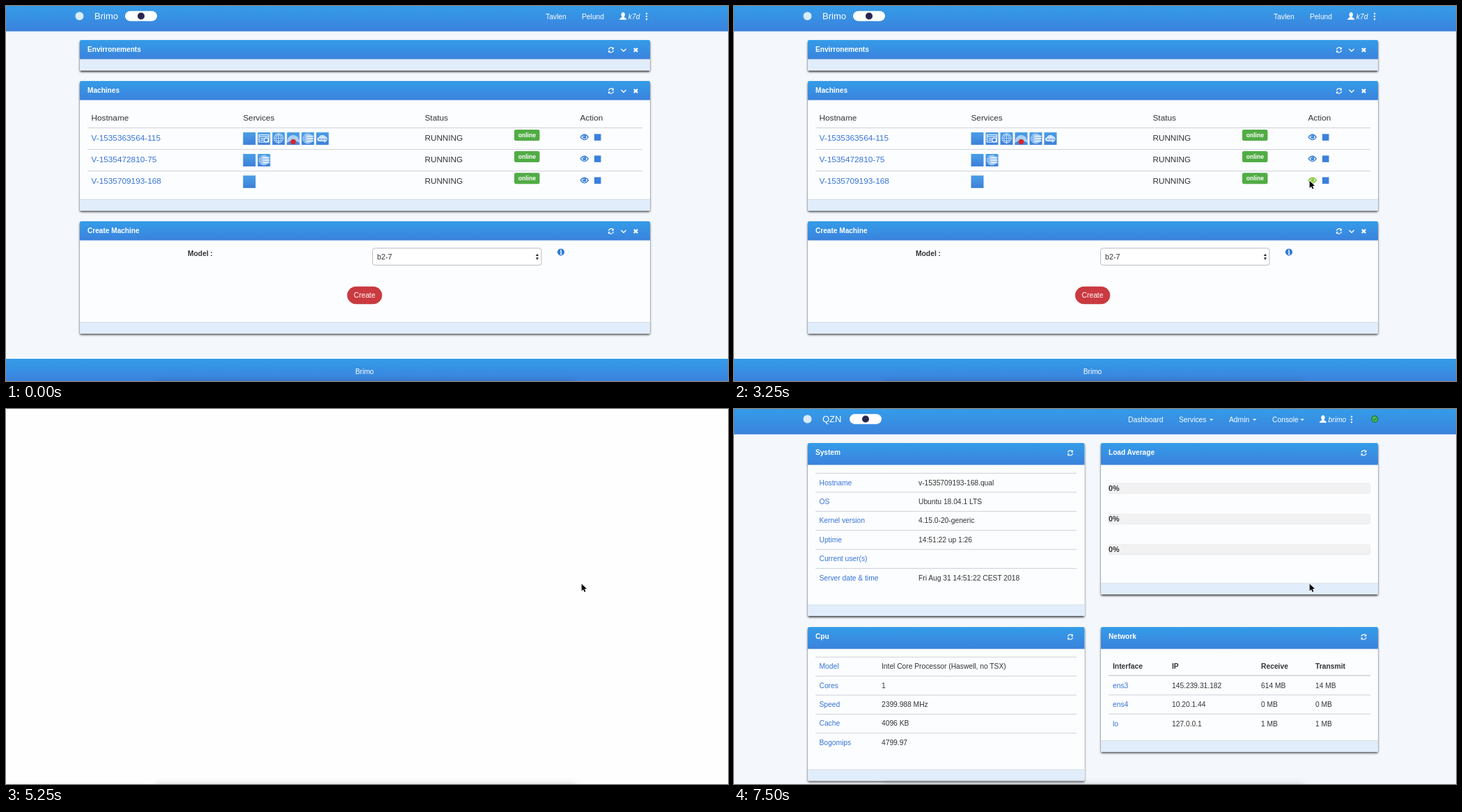
Write an HTML page that moves like this. It is 1037 px wide and 540 px high and loops after 8 s.

```html
<!DOCTYPE html>
<html lang="en">
<head>
<meta charset="utf-8">
<title>Machine dashboard</title>
<style>
html, body { margin: 0; width: 100%; height: 100%; overflow: hidden; background: #fefefe; }
svg { display: block; font-family: "Liberation Sans", Arial, sans-serif; }
text { white-space: pre; }
</style>
</head>
<body>
<svg id="stage" width="1037" height="540" viewBox="0 0 1037 540">
  <defs>
    <linearGradient id="bar" x2="0" y2="1">
      <stop offset="0" stop-color="#349ce8"/><stop offset="1" stop-color="#3b82dd"/>
    </linearGradient>
    <linearGradient id="tile" x2="0" y2="1">
      <stop offset="0" stop-color="#4b9fe6"/><stop offset="1" stop-color="#3d7fd9"/>
    </linearGradient>
    <filter id="drop" x="-5%" y="-20%" width="110%" height="160%">
      <feDropShadow dx="0" dy="2" stdDeviation="1.7" flood-color="#000" flood-opacity=".72"/>
    </filter>
    <filter id="blur" x="-20%" y="-100%" width="140%" height="300%">
      <feGaussianBlur stdDeviation="5"/>
    </filter>
  </defs>
  <g id="scenes"></g>
  <rect id="status" x="-8" y="539" height="20" fill="#000" opacity=".035" filter="url(#blur)"/>
  <rect x="214" y="539" width="604" height="22" fill="#000" opacity=".13" filter="url(#blur)"/>
  <path id="cursor" d="M0 0V10.3L2.4 8.1L4 11.8L5.8 11L4.2 7.4H7.4Z" fill="#000" stroke="#fff" stroke-width=".9" paint-order="stroke"/>
</svg>
<script>
const LINK = '#3572d9', INK = '#333', BLUE = '#3a80dc', HOVER = '#7cc62c';
const LOOP = 8000;
const $ = id => document.getElementById(id);

const rect = (x, y, w, h, fill, more = '') =>
  `<rect x="${x}" y="${y}" width="${w}" height="${h}" fill="${fill}" ${more}/>`;
const circle = (x, y, r, fill, more = '') =>
  `<circle cx="${x}" cy="${y}" r="${r}" fill="${fill}" ${more}/>`;
const path = (d, stroke, width = 1, fill = 'none') =>
  `<path d="${d}" stroke="${stroke}" stroke-width="${width}" fill="${fill}"/>`;
const text = (x, y, str, size = 10.25, fill = INK, more = '') =>
  `<text x="${x}" y="${y}" font-size="${size}" fill="${fill}" ${more}>${str.replace(/&/g, '&amp;')}</text>`;
const bold = (x, y, str, size = 10.2, fill = INK) => text(x, y, str, size, fill, 'font-weight="700"');
const at = (x, y, body, more = '') => `<g transform="translate(${x} ${y})" ${more}>${body}</g>`;
const group = (id, body) => `<g id="${id}">${body}</g>`;
const rule = (x1, x2, y, w = 1) => path(`M${x1} ${y}H${x2}`, '#cdd1d7', w);

// Icons, each centred on 0,0
const refresh = path('M-3.5 -.6A3.6 3.6 0 0 1 2.7 -2.5M3.5 .6A3.6 3.6 0 0 1 -2.7 2.5', '#fff', 1.2) +
  path('M3.9 -4.2V-.9H.7ZM-3.9 4.2V.9H-.7Z', 'none', 0, '#fff');
const chevron = path('M-3.6 -1.6L0 2L3.6 -1.6', '#fff', 1.3);
const cross = path('M-2.6 -2.6L2.6 2.6M2.6 -2.6L-2.6 2.6', '#fff', 2.2);
const caret = path('M-2.8 -1.3H2.8L0 1.6Z', 'none', 0, '#fff');
const person = path('M-5 5.2C-5 2.7 -1.6 2.6 -1.6 1.1C-3.4 -1 -3 -5.4 0 -5.4S3.4 -1 1.6 1.1C1.6 2.6 5 2.7 5 5.2Z', 'none', 0, '#fff');
const dots = [-4, 0, 4].map(y => circle(0, y, 1.25, '#fff')).join('');
const eye = '<path d="M-5.6 0Q0 -7.6 5.6 0Q0 7.6 -5.6 0Z" fill="none" stroke="currentColor" stroke-width="1.3"/>' +
  circle(0, -.5, 2.6, 'currentColor') + circle(-.8, -1.3, .8, '#fff');

const tileBase = rect(-9, -9, 18, 18, 'url(#tile)');
const tiles = {
  plain: tileBase,
  card: tileBase + rect(-7, -5.5, 14, 10.5, 'none', 'stroke="#e6f1fd" stroke-width="1.2"') +
    path('M-7 -3H7M-5 0H0M-5 2.5H-1', '#e6f1fd', 1.3) + circle(3.2, 2, 3, '#4a8fe0', 'stroke="#fff" stroke-width="1.2"'),
  globe: tileBase + circle(0, -.5, 6.6, 'none', 'stroke="#d5e7fb"') +
    path('M-6.6 -.5H6.6M0 -7V8M-5.5 -4H5.5M-5.5 3H5.5M0 -7C-5 -3 -5 2 0 6C5 2 5 -3 0 -7', '#d5e7fb', .8),
  dome: tileBase + path('M-9 5C-8 -3 -4 -5 0 -5S8 -3 9 5V9H-9Z', 'none', 0, '#a9d2f3') +
    path('M-9 9V6C-4 2 4 2 9 6V9Z', 'none', 0, '#4a86d8') + circle(0, 4.6, 3.7, '#d8232f'),
  list: tileBase + circle(0, 0, 7.6, '#9cc6f3') +
    path('M-2 -3.5H8M-2 0H8M-2 3.5H8', '#f2f8ff', 1.5) + path('M-6 -3.5H-4M-6.5 0H-4M-6 3.5H-4', '#5c9be4', 1.2),
  cloud: tileBase + path('M-5 4C-9 3 -8 -2 -5 -2C-4 -6 3 -6 4 -3C8 -3 8 3 5 4L3 6L2 4Z', 'none', 0, '#cfe3fa') +
    path('M-5 1H-2M-1 1H2M3 1H6', '#4a8fe0', 1.3)
};

function panel(x, y, w, head, bottom, title, tools) {
  return `<g filter="url(#drop)">${rect(x, y, w, bottom - y, '#fcfdff', 'rx="2"')}</g>` +
    rect(x, bottom - 16, w, 16, '#e2edfb') + path(`M${x} ${bottom - 16}H${x + w}`, '#cfd8e4', .8) +
    path(`M${x} ${y + head}V${y + 2}Q${x} ${y} ${x + 2} ${y}H${x + w - 2}Q${x + w} ${y} ${x + w} ${y + 2}V${y + head}Z`, 'none', 0, 'url(#bar)') +
    bold(x + 11, y + 17, title, 10.1, '#fff') +
    tools.map(([dx, icon]) => at(x + w + dx, y + 14.3, icon)).join('');
}

function navbar(name, pillX, userX, user, links) {
  return rect(0, 0, 1037, 540, '#f4f7fc') + rect(0, 0, 1037, 36.5, 'url(#bar)') +
    circle(105.5, 14.5, 6, '#d9ebfc') + text(127, 19.3, name, 13, '#fff') +
    rect(pillX, 7.3, 46, 14.4, '#fff', 'rx="7.2"') + circle(pillX + 23, 14.5, 5, '#28264e') +
    links.map(([x, s]) => text(x, 18.6, s, 10.3, '#fff')).join('') +
    at(userX, 14.5, person) + text(userX + 7.5, 18.6, user, 10.3, '#fff', 'font-style="italic"');
}

function machines() {
  const tools = [[-56, refresh], [-38, chevron], [-20.5, cross]];
  const rows = [
    ['V-1535363564-115', 'plain card globe dome list cloud'],
    ['V-1535472810-75', 'plain list'],
    ['V-1535709193-168', 'plain']
  ];
  const heads = [[122.5, 'Hostname'], [340.5, 'Services'], [601.5, 'Status'], [824.5, 'Action']];
  let s = navbar('Brimo', 171, 886.3, 'k7d', [[775, 'Tavlen'], [827, 'Pelund']]) + at(920, 15, dots);
  s += panel(106, 49, 819, 27.5, 93, 'Envirronements', tools);
  s += panel(106, 108, 819, 27.5, 294.5, 'Machines', tools);
  s += heads.map(([x, h]) => text(x, 165, h, 11.8)).join('');
  rows.forEach(([host, icons], i) => {
    const y = 189.3 + i * 31.1;
    s += rule(117, 914, y - 13.8) + text(122.5, y + 4.4, host, 11.8, LINK);
    s += icons.split(' ').map((k, n) => at(349.5 + n * 21, y + 1.6, tiles[k])).join('');
    s += text(601.5, y + 4.4, 'RUNNING', 11.7) + rect(730, y - 11.3, 36.5, 16, '#51ac46', 'rx="2.5"');
    s += bold(735.7, y - .3, 'online', 8.6, '#fff');
    s += at(830.8, y - .5, eye, `id="eye${i}"`) + rect(845, y - 5, 9.5, 9.5, BLUE);
  });
  s += panel(106, 310, 819, 27.5, 471.5, 'Create Machine', tools);
  s += bold(261, 359.5, 'Model :', 10.3);
  s += rect(526.5, 348.8, 242.5, 24.4, '#fff', 'rx="3.5" stroke="#b9bcc1"') + text(533, 365, 'b2-7', 10.8);
  s += path('M760.8 360L763 356.4L765.2 360ZM760.8 362.2L763 365.8L765.2 362.2Z', 'none', 0, INK);
  s += circle(797, 354.4, 5, '#2f7bd9') + path('M796 353.7H797.3V357.3M795.7 357.3H798.6', '#fff', 1.2) + circle(797, 351.7, .9, '#fff');
  s += rect(490.3, 404.3, 49.6, 24.6, '#ca3a40', 'rx="12.3" stroke="#bd3439" stroke-width=".7"');
  s += text(515, 420.2, 'Create', 10.3, '#fff', 'text-anchor="middle"');
  s += rect(0, 508, 1037, 32, 'url(#bar)') + text(515, 530.3, 'Brimo', 10.2, '#fff', 'text-anchor="middle"');
  return s;
}

// Rows of label and value; values sit in their own group to appear later
function facts(id, y, valueX, rows) {
  const line = i => y + i * 27.42;
  return rows.map(([k], i) => rule(117, 492, line(i)) + text(122.5, line(i) + 17, k, 10.25, LINK)).join('') +
    group(id, rows.map(([, v], i) => text(valueX, line(i) + 17, v)).join(''));
}

function network(bottom, cols, rows) {
  const heads = ['Interface', 'IP', 'Receive', 'Transmit'];
  let s = panel(527, 314, 398, 31.5, bottom, 'Network', [[-20.5, refresh]]);
  s += heads.map((h, i) => bold(cols[i], 373.8, h, 10.3)).join('') + rule(538, 914, 383.8, 1.5);
  rows.forEach((r, i) => {
    const y = 401.7 + i * 27.4;
    if (i) s += rule(538, 914, y - 17.3);
    s += r.map((v, c) => text(cols[c], y, v, 10.25, c ? INK : LINK)).join('');
  });
  return s;
}

function dashboard() {
  const tool = [[-20.5, refresh]];
  let s = navbar('QZN', 166, 846, 'brimo', [[566, 'Dashboard'], [639, 'Services'], [711, 'Admin'], [773, 'Console']]);
  s += [685.7, 747.7, 816.2].map(x => at(x, 15.5, caret)).join('') + at(887, 15, dots);
  s += at(920.3, 14.4, circle(0, 0, 4.4, 'none', 'id="ring" stroke="#14803a" stroke-width="1.4"') + path('M-2.2 0L-.5 1.7L2.5 -1.8', '#14803a', 1.3));
  s += panel(106, 49, 397.5, 31.5, 298, 'System', tool);
  s += facts('sysValues', 92.5, 265, [
    ['Hostname', 'v-1535709193-168.qual'], ['OS', 'Ubuntu 18.04.1 LTS'], ['Kernel version', '4.15.0-20-generic'],
    ['Uptime', '14:51:22 up 1:26'], ['Current user(s)', ''], ['Server date & time', 'Fri Aug 31 14:51:22 CEST 2018']
  ]);
  s += panel(527, 49, 398, 31.5, 267, 'Load Average', tool);
  s += [107, 151.2, 195.4].map(y =>
    rect(538, y, 375.5, 14.4, '#f2f2f3', 'rx="2.5" stroke="#e4e5e7" stroke-width=".7"') + bold(538, y + 11, '0%', 10.7)).join('');
  s += panel(106, 314, 397.5, 31.5, 535.3, 'Cpu', tool);
  s += facts('cpuValues', 357.2, 212, [
    ['Model', 'Intel Core Processor (Haswell, no TSX)'], ['Cores', '1'], ['Speed', '2399.988 MHz'],
    ['Cache', '4096 KB'], ['Bogomips', '4799.97']
  ]);
  s += group('netEmpty', network(412, [544, 658, 703, 808], []));
  s += group('netFull', network(493.5, [544, 629, 757, 835], [
    ['ens3', '145.239.31.182', '614 MB', '14 MB'], ['ens4', '10.20.1.44', '0 MB', '0 MB'], ['lo', '127.0.0.1', '1 MB', '1 MB']
  ]));
  return s;
}

$('scenes').innerHTML = group('machines', machines()) +
  group('blank', rect(0, 0, 1037, 540, '#fefefe')) + group('dashboard', dashboard());

const show = (id, on) => { $(id).style.display = on ? '' : 'none'; };
const within = (t, a, b) => t >= a && t < b;
// Last value in [time, ...value] steps that has started
const step = (t, steps) => steps.filter(s => s[0] <= t).pop();

const moves = [[0, 844, 48], [1500, 878, 174.5], [1750, 846.5, 244.5], [2000, 828.7, 248], [2250, 826.7, 251.7]];
const status = [[0, 0], [3750, 330], [4000, 0], [4750, 165], [5250, 210], [6250, 0]];

function draw(t) {
  show('machines', t < 3500);
  show('blank', within(t, 3500, 6250));
  show('dashboard', t >= 6250);
  show('sysValues', t >= 6500);
  show('cpuValues', t >= 6500);
  show('netEmpty', t < 6750);
  show('netFull', t >= 6750);
  show('cursor', t >= 1000);
  const [, x, y] = step(t, moves);
  $('cursor').setAttribute('transform', `translate(${x} ${y})`);
  $('status').setAttribute('width', step(t, status)[1]);
  $('eye0').style.color = BLUE;
  $('eye1').style.color = within(t, 2500, 3250) ? HOVER : BLUE;
  $('eye2').style.color = within(t, 3250, 3500) ? HOVER : BLUE;
  $('ring').setAttribute('fill', t >= 7500 ? '#5cb85c' : 'none');
}

const start = performance.now();
function tick() {
  draw((performance.now() - start) % LOOP);
  requestAnimationFrame(tick);
}
tick();
</script>
</body>
</html>
```
